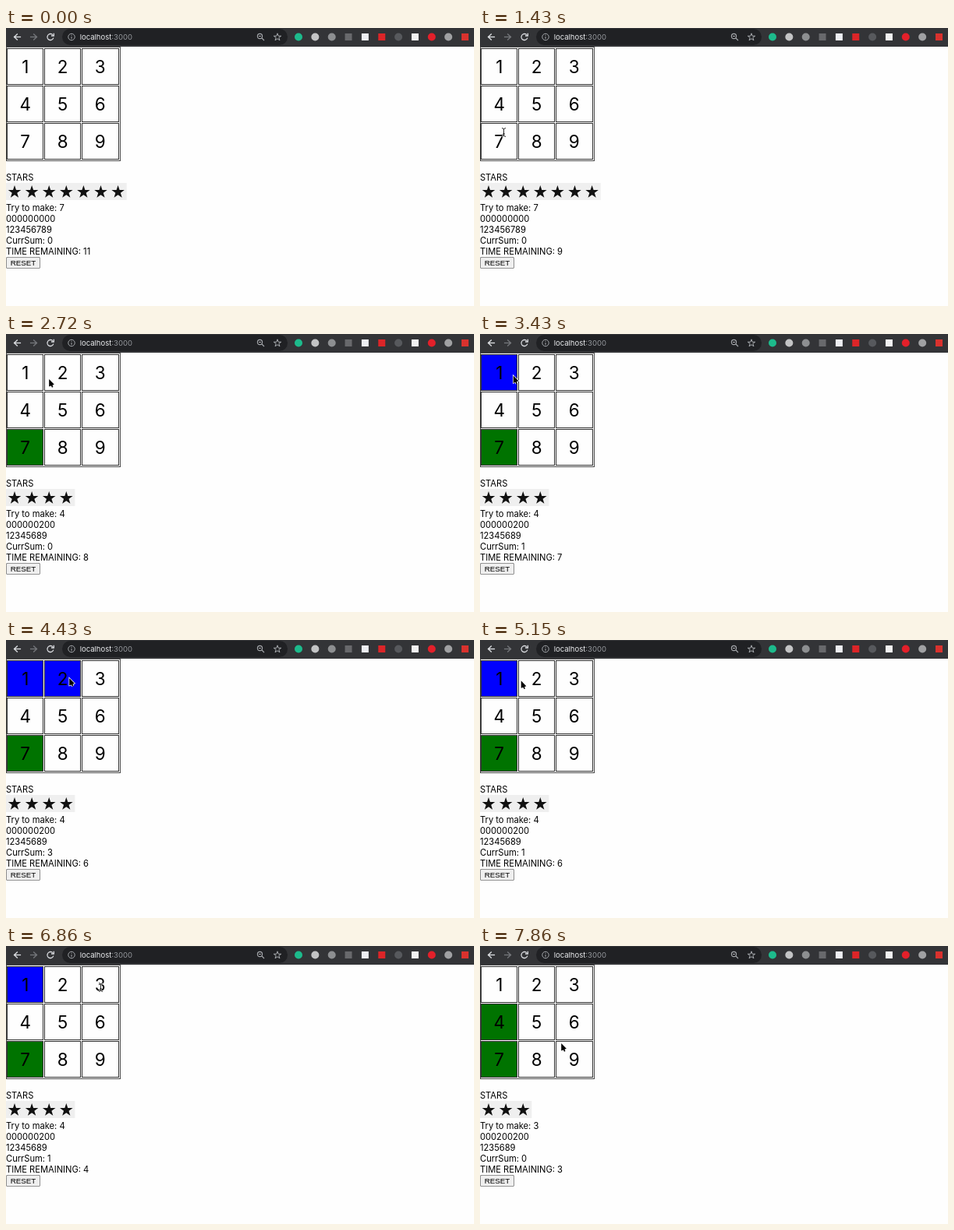
Recreate the animation shown at these times as an HTML page with a canvas. Size 600x357 px, loop 8 s.

```html
<!DOCTYPE html>
<html lang="en">
<head>
<meta charset="utf-8">
<title>Star sum game</title>
<style>
html, body { margin: 0; width: 100%; height: 100%; overflow: hidden; background: #fefefe; }
canvas { display: block; width: 600px; height: 357px; }
</style>
</head>
<body>
<canvas id="stage" width="600" height="357"></canvas>
<script>
const ctx = document.getElementById('stage').getContext('2d');
const LOOP = 8000, FPS = 7, PITCH = 48;
const SANS = 'Inter, sans-serif';
const DIGITS = [1, 2, 3, 4, 5, 6, 7, 8, 9];

const column = d => (d - 1) % 3;
const row = d => Math.floor((d - 1) / 3);

function spot(d, dx = 0, dy = 0) {
  return { x: 24.7 + PITCH * column(d) + dx, y: 49.5 + PITCH * row(d) + dy };
}

// Pointer moves, timed in steps of the loop
const ENTRY = { x: 215, y: 30 };
const MOVES = [
  { from: 2, until: 10, to: spot(7, 5, -11.5) },
  { from: 13, until: 19, to: spot(2, -17.5, 8.5) },
  { from: 19, until: 21, to: spot(1, 18, 4) },
  { from: 26, until: 30, to: spot(2, 8.5, -0.5) },
  { from: 34, until: 37, to: spot(1, 18, 4) },
  { from: 42, until: 47, to: spot(3, 0.5, 3.5) },
  { from: 52, until: 55, to: spot(9, -16.5, -20.5) }
];

function pointerAt(n) {
  let { x, y } = ENTRY;
  for (const m of MOVES) {
    const t = Math.min(1, Math.max(0, (n - m.from) / (m.until - m.from)));
    const k = t * t * (3 - 2 * t);
    x += (m.to.x - x) * k;
    y += (m.to.y - y) * k;
  }
  return { x, y };
}

function gameAt(n) {
  const within = (a, b) => n >= a && n < b;
  const picked = [];
  if (within(22, 37) || within(43, 49)) picked.push(1);
  if (within(31, 34)) picked.push(2);
  return {
    picked,
    solved: n < 11 ? [] : n < 49 ? [7] : [7, 4],
    target: n < 11 ? 7 : n < 49 ? 4 : 3,
    sum: picked.reduce((a, b) => a + b, 0),
    time: 11 - Math.floor((n + 4) / FPS)
  };
}

function box(x, y, w, h, fill, r = 0) {
  ctx.fillStyle = fill;
  ctx.beginPath();
  ctx.roundRect(x, y, w, h, r);
  ctx.fill();
}

function frame(x, y, w, h, color) {
  ctx.lineWidth = 1;
  ctx.strokeStyle = color;
  ctx.strokeRect(x + 0.5, y + 0.5, w - 1, h - 1);
}

function ring(x, y, r, color, width = 1, from = 0, to = Math.PI * 2) {
  ctx.strokeStyle = color;
  ctx.lineWidth = width;
  ctx.beginPath();
  ctx.arc(x, y, r, from, to);
  ctx.stroke();
}

function line(color, width, ...points) {
  ctx.strokeStyle = color;
  ctx.lineWidth = width;
  ctx.beginPath();
  for (const [x, y] of points) ctx.lineTo(x, y);
  ctx.stroke();
}

function text(str, x, y, size, color = '#000', align = 'left', family = SANS) {
  ctx.font = size + 'px ' + family;
  ctx.textAlign = align;
  ctx.fillStyle = color;
  ctx.fillText(str, x, y);
}

function starPath(x, y, r) {
  ctx.beginPath();
  for (let i = 0; i < 10; i++) {
    const a = -Math.PI / 2 + i * Math.PI / 5, d = i % 2 ? r * 0.39 : r;
    ctx.lineTo(x + d * Math.cos(a), y + d * Math.sin(a));
  }
  ctx.closePath();
}

// dir is -1 for back, 1 for forward
function navArrow(x, dir, color) {
  const y = 11.5, tip = x + 4.3 * dir;
  line(color, 1.3, [x - 4.3 * dir, y], [tip, y]);
  line(color, 1.3, [x, y - 4], [tip, y], [x, y + 4]);
}

function drawAddress() {
  const light = '#dfe1e5', mid = '#a5a8ac';
  box(0, 0, 600, 24, '#333437');
  box(72, 1, 289, 21, '#202124', 10.5);
  navArrow(14.8, -1, light);
  navArrow(35.2, 1, '#76787c');
  ring(57, 11.5, 4, light, 1.3, 0.3, 5.5);
  line(light, 1.3, [61.3, 6.8], [61.3, 10], [58, 10]);
  ring(84, 11.5, 4.2, mid);
  line(mid, 1, [84, 11], [84, 14]);
  line(mid, 1, [84, 9], [84, 10]);
  text('localhost', 94.7, 15, 9.5, '#eceef0');
  text(':3000', 94.7 + ctx.measureText('localhost').width, 15, 9.5, '#95989d');
  ring(325.5, 10.5, 3.1, mid, 1.1);
  line(mid, 1.1, [328, 13], [331, 16]);
  line(mid, 1.1, [324, 10.5], [327, 10.5]);
  starPath(348, 11.8, 5);
  ctx.lineWidth = 1;
  ctx.stroke();
}

function drawExtensions() {
  const round = ['#1dbb8c', '#c3c4c5', '#8d8f91', '#57595d', '#e3202a', '#a0a1a3'];
  const square = ['#68696c', '#edeef2', '#dc2528', '#f1f1f1', '#d9322e'];
  [...'ooo###o#oo#'].forEach((kind, i) => {
    const r = kind === 'o' ? 5 : 4.5;
    const fill = (kind === 'o' ? round : square).shift();
    box(375 + 21.35 * i - r, 11.5 - r, 2 * r, 2 * r, fill, kind === 'o' ? r : 0);
  });
}

function drawGrid(g) {
  frame(0, 24, 147, 147, '#484848');
  for (const d of DIGITS) {
    const offset = 48.25 * column(d);
    const left = Math.round(0.9 + offset), right = Math.round(48.2 + offset);
    const top = 26 + PITCH * row(d), width = right - left;
    if (g.solved.includes(d)) box(left, top, width, 47, '#007300');
    if (g.picked.includes(d)) box(left, top, width, 47, '#0000fe');
    frame(left, top, width, 47, '#303030');
    const c = spot(d);
    text(d, c.x, c.y + 8.5, 22.4, '#000', 'center');
  }
}

function drawPanel(g) {
  const pitch = 22.1;
  text('STARS', 0, 196, 11.15);
  box(0, 199, g.target * pitch, 22, '#efefef');
  for (let i = 0; i < g.target; i++) {
    starPath(11 + pitch * i, 210.8, 8.7);
    ctx.fillStyle = '#111';
    ctx.fill();
  }
  [
    'Try to make: ' + g.target,
    DIGITS.map(d => g.solved.includes(d) ? 2 : 0).join(''),
    DIGITS.filter(d => !g.solved.includes(d)).join(''),
    'CurrSum: ' + g.sum,
    'TIME REMAINING: ' + g.time
  ].forEach((str, i) => text(str, 0, 235 + 14 * i, 11.15));

  box(0, 294, 44, 15, '#767676', 2);
  box(0.8, 294.8, 42.4, 13.4, '#efefef', 1.5);
  text('RESET', 22, 305, 9.8, '#000', 'center', '"Liberation Sans", Arial, sans-serif');
}

function drawBeam(x, y) {
  const cx = Math.round(x) + 0.5;
  for (const [color, width] of [['#fff', 2], ['#222', 1]]) {
    line(color, width, [cx, y - 4.5], [cx, y + 4.5]);
    line(color, width, [cx - 1.5, y + 2], [cx + 1.5, y + 2]);
    for (const s of [-1, 1])
      line(color, width, [cx - 2.5, y + 5.5 * s], [cx, y + 4.5 * s], [cx + 2.5, y + 5.5 * s]);
  }
}

function drawArrow(x, y) {
  for (const [color, grow] of [['#fff', 1.5], ['#000', 0]]) {
    line(color, 1.7 + grow, [x + 2.6, y + 6], [x + 4.5, y + 10.4]);
    ctx.beginPath();
    ctx.moveTo(x, y);
    ctx.lineTo(x, y + 9.4);
    ctx.lineTo(x + 6.6, y + 6.8);
    ctx.closePath();
    ctx.fillStyle = color;
    ctx.fill();
    ctx.lineWidth = grow;
    if (grow) ctx.stroke();
  }
}

function drawPointer({ x, y }) {
  const overDigit = DIGITS.some(d => {
    const c = spot(d);
    return Math.abs(x - c.x) <= 7 && Math.abs(y - c.y) <= 14;
  });
  (overDigit ? drawBeam : drawArrow)(x, y);
}

function draw(ms) {
  const n = Math.floor((ms % LOOP) * FPS / 1000 + 0.05);
  const game = gameAt(n);
  box(0, 0, 600, 357, '#fefefe');
  drawAddress();
  drawExtensions();
  drawGrid(game);
  drawPanel(game);
  if (n >= MOVES[0].from) drawPointer(pointerAt(n));
}

const start = performance.now();
function tick() {
  draw(performance.now() - start);
  requestAnimationFrame(tick);
}
tick();
</script>
</body>
</html>
```
